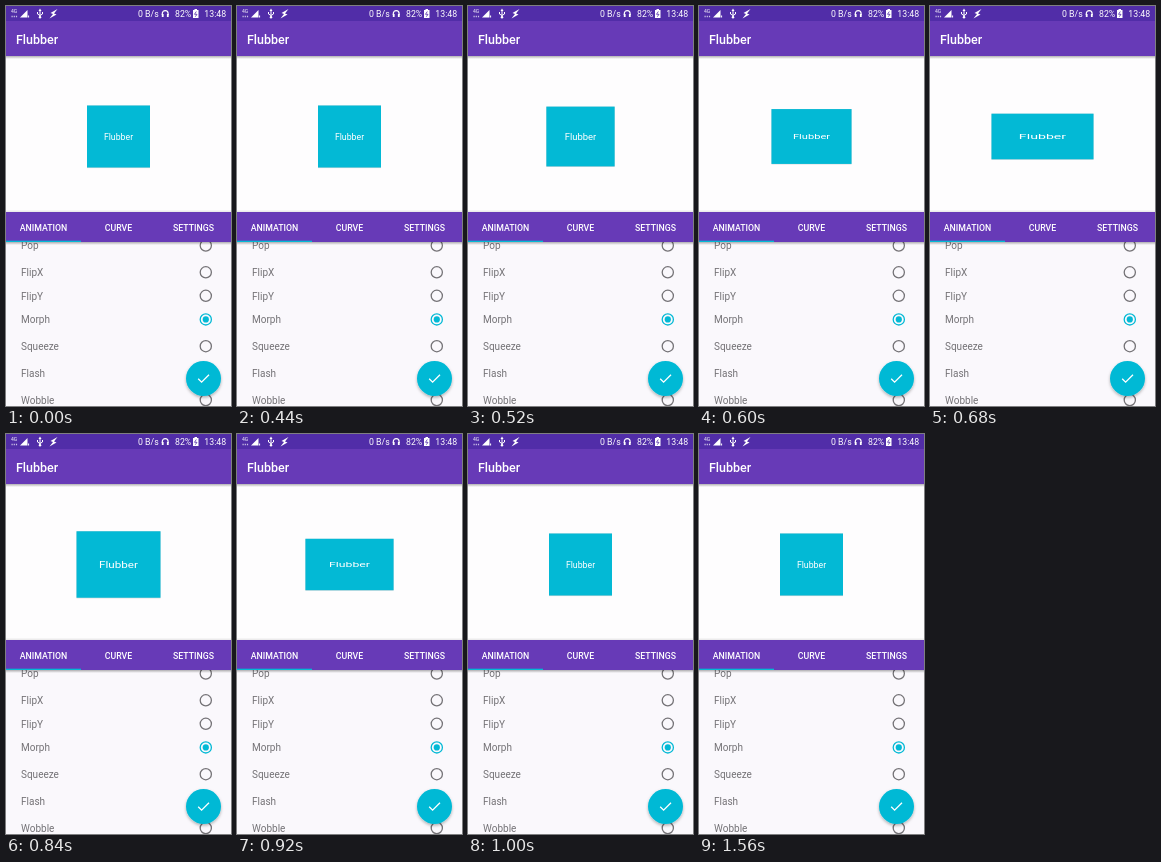
Write an HTML page that moves like this. It is 225 by 400 pixels and loops after 1600 ms.

```html
<!DOCTYPE html>
<html lang="en">
<head>
<meta charset="utf-8">
<title>Morph animation</title>
<style>
  html, body { margin: 0; width: 100%; height: 100%; overflow: hidden; background: #faf8fc; }
  svg { display: block; width: 100%; height: 100%; }
  text { font-family: Roboto, sans-serif; font-size: 8.75px; fill: #fff; }
  .title { font-size: 12.5px; font-weight: 500; }
  .tab { font-weight: 500; text-anchor: middle; }
  .row { font-size: 10px; fill: #747276; }
  .radio { fill: none; stroke: #747276; stroke-width: 1.3; }
  .on { stroke: #03b9d5; }
  .line { fill: none; stroke: #fff; }
</style>
</head>
<body>
<svg viewBox="0 0 225 400">
  <defs>
    <linearGradient id="fade" x2="0" y2="1">
      <stop offset="0" stop-color="#000" stop-opacity=".3"/>
      <stop offset="1" stop-color="#000" stop-opacity="0"/>
    </linearGradient>
    <filter id="lift" x="-30%" y="-30%" width="160%" height="160%">
      <feDropShadow dx="0" dy="1.6" stdDeviation="1.6" flood-opacity=".3"/>
    </filter>
  </defs>

  <rect width="225" height="400" fill="#faf8fc"/>
  <g id="list"></g>

  <rect y="50" width="225" height="156" fill="#fefdfe"/>
  <rect y="50" width="225" height="3" fill="url(#fade)"/>
  <rect y="204.5" width="225" height="1.5" fill="#000" opacity=".07"/>

  <g id="box">
    <rect x="-31.5" y="-31" width="63" height="62.6" fill="#000" opacity=".15"/>
    <rect x="-31.5" y="-31" width="63" height="62" fill="#03b9d5"/>
    <text y="3.2" text-anchor="middle">Flubber</text>
  </g>

  <rect y="206" width="225" height="30" fill="#673ab7"/>
  <rect y="236" width="225" height="3" fill="url(#fade)"/>
  <rect y="234.7" width="75" height="1.3" fill="#03b9d5"/>
  <text class="tab" x="37.5" y="224.5">ANIMATION</text>
  <text class="tab" x="112.5" y="224.5">CURVE</text>
  <text class="tab" x="187.5" y="224.5">SETTINGS</text>

  <rect width="225" height="50" fill="#673ab7"/>
  <rect width="225" height="15" fill="#512da8"/>
  <text class="title" x="10" y="37.5">Flubber</text>

  <!-- Status bar -->
  <text x="5" y="7.4" style="font-size:5px">4G</text>
  <path d="M5.5 10.5h6" class="line" stroke-width="1.5" stroke-dasharray="1.2 1" opacity=".7"/>
  <path d="M14 11.5L21.5 4V11.5Z" fill="#fff"/>
  <path d="M22.6 9.5v2" class="line"/>
  <path d="M34 11V4M31.5 6v2L34 9.5L36.5 8V6" class="line"/>
  <path d="M32.5 5L34 2.5L35.5 5Z" fill="#fff"/>
  <circle cx="34" cy="11.3" r="1.2" fill="#fff"/>
  <path d="M51.5 3L44.5 7L47 8L43.5 12.5L50.5 8.5L48 7.5Z" fill="#fff"/>
  <text x="132" y="11.2">0 B/s</text>
  <path d="M156.3 9V7.5a2.9 2.9 0 0 1 5.8 0V9" class="line" stroke-width="1.2"/>
  <path d="M155.8 8h1.8v3h-1.8zM160.9 8h1.8v3h-1.8z" fill="#fff"/>
  <text x="169" y="11.2">82%</text>
  <path d="M187 4h1.5V3h2.5v1h1.5v8h-5.5z" fill="#fff"/>
  <path d="M190.3 5.5L188.5 8.3H191L189.3 10.7" fill="none" stroke="#512da8" stroke-width=".8"/>
  <text x="198.3" y="11.2">13:48</text>

  <circle cx="197.5" cy="372.5" r="17.5" fill="#03b9d5" filter="url(#lift)"/>
  <path d="M192.2 372.8L195.6 376.2L203 368.8" class="line" stroke-width="1.3"/>
</svg>
<script>
  const LOOP = 1600, STEP = 40;
  const rows = { Pop: 239.5, FlipX: 266.3, FlipY: 289.8, Morph: 313.4, Squeeze: 340.2, Flash: 367, Wobble: 394 };

  document.getElementById('list').innerHTML = Object.entries(rows).map(([name, y]) => {
    const on = name === 'Morph';
    return `<text class="row" x="15" y="${y + 3.8}">${name}</text>
      <circle class="radio ${on ? 'on' : ''}" cx="199.8" cy="${y}" r="5.6"/>` +
      (on ? `<circle cx="199.8" cy="${y}" r="3.1" fill="#03b9d5"/>` : '');
  }).join('');

  // Time in ms -> number of stretch segments completed.
  const pace = [[440, 0], [600, .385], [760, 1.61], [840, 2.63], [960, 3.76], [1000, 4]];
  const rise = pace.slice(1).map(([t, v], i) => (v - pace[i][1]) / (t - pace[i][0]));
  const slope = pace.map((_, i) => {
    if (i === 0) return 0;
    if (i === rise.length) return rise[i - 1];
    return 2 * rise[i - 1] * rise[i] / (rise[i - 1] + rise[i]);
  });

  // Monotone cubic through the pace points.
  function phaseAt(t) {
    if (t <= 440 || t >= 1000) return 0;
    const i = pace.findIndex(p => p[0] > t) - 1;
    const [t0, v0] = pace[i], [t1, v1] = pace[i + 1];
    const d = t1 - t0, s = (t - t0) / d, r = 1 - s;
    return v0 * r * r * (1 + 2 * s) + slope[i] * d * s * r * r
      + v1 * s * s * (3 - 2 * s) - slope[i + 1] * d * s * s * r;
  }

  const WIDE = 1.705, SLIM = .7;
  const scaleX = [1, WIDE, SLIM, WIDE, 1];
  const scaleY = [1, SLIM, WIDE, SLIM, 1];

  function along(values, phase) {
    const i = Math.min(Math.floor(phase), values.length - 2);
    return values[i] + (values[i + 1] - values[i]) * (phase - i);
  }

  const box = document.getElementById('box');
  function draw(now) {
    const phase = phaseAt(Math.floor(now % LOOP / STEP) * STEP);
    box.setAttribute('transform',
      `translate(112.5 130.5) scale(${along(scaleX, phase)} ${along(scaleY, phase)})`);
  }

  const start = performance.now();
  function tick() {
    draw(performance.now() - start);
    requestAnimationFrame(tick);
  }
  tick();
</script>
</body>
</html>
```
